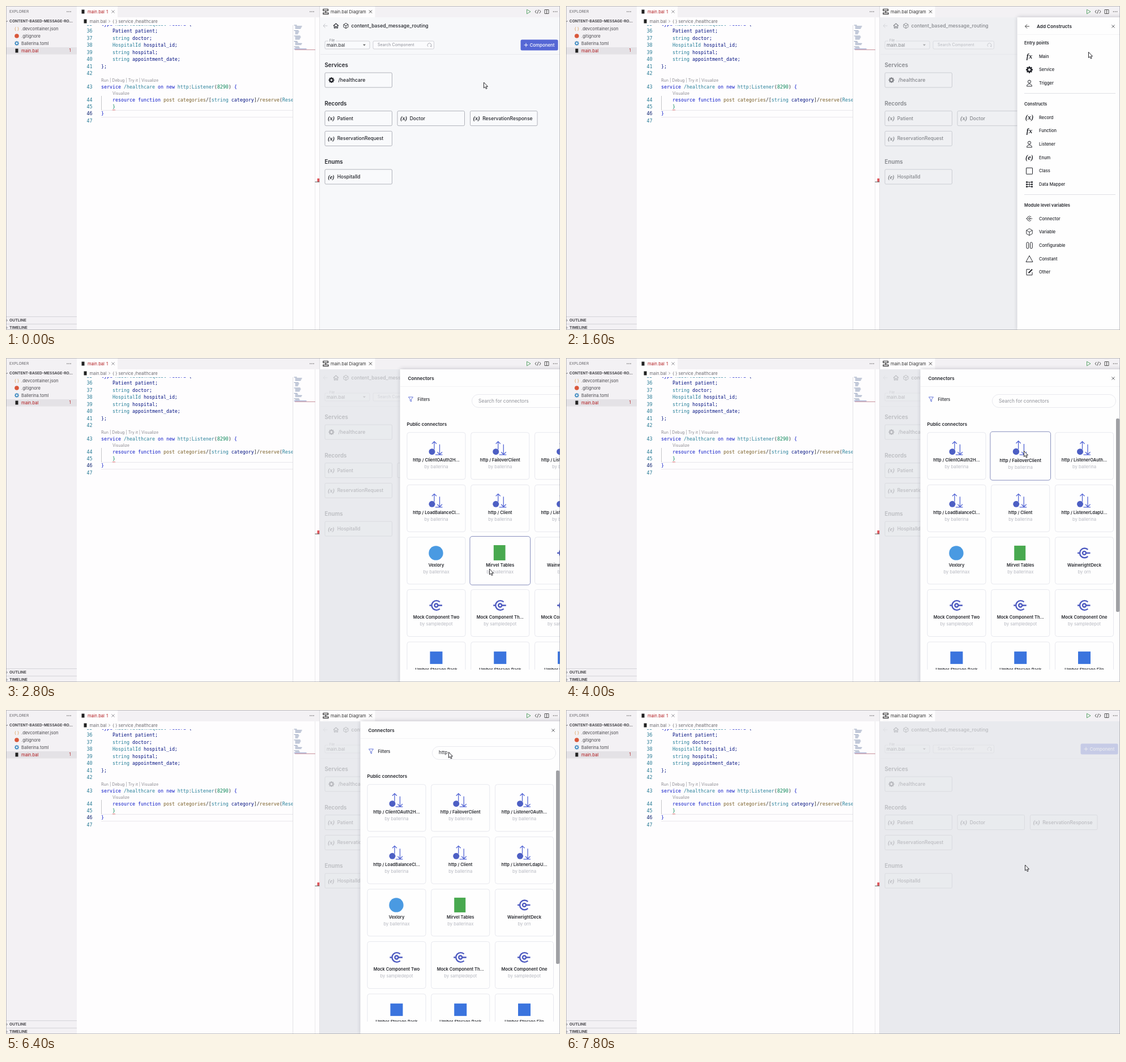
An HTML page with a canvas that plays this animation: 978 by 573 pixels, repeating every 8 s.

```html
<!DOCTYPE html>
<html lang="en">
<head>
<meta charset="utf-8">
<title>Diagram editor</title>
<style>
html, body { margin: 0; width: 100%; height: 100%; overflow: hidden; background: #fefdfe; }
canvas { display: block; width: 978px; height: 573px; }
</style>
</head>
<body>
<canvas></canvas>
<script>
const W = 978, H = 573, LOOP = 8000, STEP = 200;
const canvas = document.querySelector('canvas');
const c = canvas.getContext('2d');
const dpr = window.devicePixelRatio || 1;
canvas.width = W * dpr;
canvas.height = H * dpr;

const INK = '#24262c', BLUE = '#5567d5', RED = '#b0181c';
const SANS = 'Inter, sans-serif', SERIF = '"Liberation Serif", serif', MONO = '"DejaVu Sans Mono", monospace';

// Pointer tip: time, x, y
const POINTER = [
  [0, 843, 134.5], [200, 846, 131], [400, 868, 112], [600, 900, 90], [800, 931, 73], [1000, 936, 69],
  [1400, 935, 70], [1600, 922, 81], [1800, 900, 160], [2000, 874, 265], [2200, 858, 345], [2400, 853, 372.5],
  [3200, 853, 372.5], [3400, 845, 330], [3600, 832, 270], [3800, 818, 218], [4000, 808, 164], [4200, 790, 105],
  [4400, 781, 74], [6800, 781, 74], [7000, 783, 86], [7200, 792, 140], [7400, 804, 225], [7600, 810, 270], [7800, 810, 273.5]
];

const CARDS = [
  ['http / ClientOAuth2H...', 'ballerina', 'http'], ['http / FailoverClient', 'ballerina', 'http'], ['http / ListenerOAuth...', 'ballerina', 'http'],
  ['http / LoadBalanceCl...', 'ballerina', 'http'], ['http / Client', 'ballerina', 'http'], ['http / ListenerLdapU...', 'ballerina', 'http'],
  ['Vexlory', 'ballerinax', 'disc'], ['Mirvel Tables', 'ballerinax', 'green'], ['WainwrightDeck', 'orn', 'plug'],
  ['Mock Component Two', 'sampledepot', 'plug'], ['Mock Component Th...', 'sampledepot', 'plug'], ['Mock Component One', 'sampledepot', 'plug'],
  ['Umber Storage Pack', 'ballerinax', 'blue'], ['Umber Storage Pack', 'ballerinax', 'blue'], ['Umber Storage File', 'ballerinax', 'blue']
];

const CONSTRUCTS = [
  ['Entry points', 65.5, 89, [['Main', 'fx'], ['Service', 'gear'], ['Trigger', 'person']]],
  ['Constructs', 173, 197, [['Record', '(x)'], ['Function', 'fx'], ['Listener', 'person'], ['Enum', '(e)'], ['Class', 'box'], ['Data Mapper', 'mapper']]],
  ['Module level variables', 352, 376, [['Connector', 'plug'], ['Variable', 'cube'], ['Configurable', 'config'], ['Constant', 'triangle'], ['Other', 'edit']]]
];

function rect(x, y, w, h, color) {
  c.fillStyle = color;
  c.fillRect(x, y, w, h);
}

function box(x, y, w, h, r, fill, stroke, width = 1) {
  c.beginPath();
  c.roundRect(x, y, w, h, r);
  if (fill) { c.fillStyle = fill; c.fill(); }
  if (stroke) { c.strokeStyle = stroke; c.lineWidth = width; c.stroke(); }
}

// y is the middle of the capitals
function text(s, x, y, size, color = INK, weight = 400, align = 'left', family = SANS) {
  c.font = `${weight} ${size}px ${family}`;
  c.textAlign = align;
  c.fillStyle = color;
  c.fillText(s, x, y + size * 0.35);
}

function path(d, x, y, stroke, width = 1, fill) {
  const p = new Path2D(d);
  c.save();
  c.translate(x, y);
  if (fill) { c.fillStyle = fill; c.fill(p); }
  if (stroke) { c.strokeStyle = stroke; c.lineWidth = width; c.stroke(p); }
  c.restore();
}

function disc(x, y, r, fill, stroke, width = 1) {
  c.beginPath();
  c.arc(x, y, r, 0, 7);
  if (fill) { c.fillStyle = fill; c.fill(); }
  if (stroke) { c.strokeStyle = stroke; c.lineWidth = width; c.stroke(); }
}

function clip(x, y, w, h, draw) {
  c.save();
  c.beginPath();
  c.rect(x, y, w, h);
  c.clip();
  draw();
  c.restore();
}

const cross = (x, y, color = '#55565c', r = 2.6) => path(`M${-r} ${-r}L${r} ${r}M${r} ${-r}L${-r} ${r}`, x, y, color, 0.9);
const dots = (x, y) => [-3, 0, 3].forEach(d => disc(x + d, y, 0.75, '#444'));
const backArrow = (x, y, color) => path('M4 0H-3.5M0-3.5L-3.5 0L0 3.5', x, y, color);

function gear(x, y, r, color) {
  c.strokeStyle = color;
  c.lineWidth = r * 0.4;
  c.beginPath();
  for (let i = 0; i < 8; i++) {
    const a = i * Math.PI / 4;
    c.moveTo(x, y);
    c.lineTo(x + Math.cos(a) * r, y + Math.sin(a) * r);
  }
  c.stroke();
  disc(x, y, r * 0.78, color);
  disc(x, y, r * 0.36, '#fff');
}

function plug(x, y, s, color, width) {
  path(`M${4.2 * s} ${-4 * s}A${5.6 * s} ${5.6 * s} 0 1 0 ${4.2 * s} ${4 * s}M${7 * s} 0H${2 * s}M${-8 * s} 0H${-5.6 * s}`, x, y, color, width);
  disc(x, y, 2 * s, null, color, width);
}

function cube(x, y, r) {
  const a = r * 0.87, b = r / 2;
  path(`M0 ${-r}L${a} ${-b}V${b}L0 ${r}L${-a} ${b}V${-b}ZM${-a} ${-b}L0 0L${a} ${-b}M0 0V${r}`, x, y, INK, 0.9);
}

function icon(kind, x, y) {
  if (kind === 'gear') gear(x, y, 6, INK);
  else if (kind === 'plug') plug(x, y, 0.75, INK, 0.9);
  else if (kind === 'cube') cube(x, y, 6);
  else if (kind === 'person') {
    disc(x, y - 2.6, 2.6, null, INK);
    path('M-4.5 5.5C-4.5 0 4.5 0 4.5 5.5Z', x, y, INK);
  } else if (kind === 'box') box(x - 5.5, y - 5.5, 11, 11, 0.5, null, INK);
  else if (kind === 'triangle') path('M0-5.5L6 5.5H-6Z', x, y, INK);
  else if (kind === 'config') [-5, 1.5].forEach(d => box(x + d, y - 5.5, 3.7, 11, 1.8, null, INK));
  else if (kind === 'edit') {
    path('M1-5H-5V5H5V0', x, y, INK);
    path('M-1.5 1.5L5-5', x, y, INK, 2.2);
  } else if (kind === 'mapper') {
    path('M-5-4H5M-5 0H5M-5 4H5M0-4V4', x, y, INK, 0.9);
    for (const d of [-4, 0, 4]) { rect(x - 6, y + d - 1.2, 3, 2.4, INK); rect(x + 3, y + d - 1.2, 3, 2.4, INK); }
  } else text(kind, x, y, 12.5, INK, 'italic 700', 'center', SERIF);
}

function drawSidebar() {
  rect(0, 0, 125, H, '#f3f1f4');
  text('EXPLORER', 6, 10, 6.7, '#66656a');
  dots(111, 10);
  path('M-1.5-1L0 1L1.5-1', 1.5, 27, '#666', 0.8);
  text('CONTENT-BASED-MESSAGE-RO...', 6, 27, 6.6, '#48474c', 700);
  rect(0, 73, 125, 12.5, '#e4e2e6');
  text('{ }', 19, 40, 7.5, '#d99a4e', 400, 'center');
  disc(19, 53, 3.8, '#d9583b');
  gear(19, 66, 4, '#4f93c5');
  rect(16.5, 75.5, 5, 7, '#222');
  ['.devcontainer.json', '.gitignore', 'Ballerina.toml', 'main.bal'].forEach((name, i) =>
    text(name, 27, 40 + 13 * i, 7.6, i === 3 ? RED : '#4c4b50'));
  text('1', 113, 79, 7, RED, 400, 'center');
  for (const [name, y] of [['OUTLINE', 556], ['TIMELINE', 569]]) {
    rect(0, y - 7, 125, 0.8, '#cfcdd2');
    path('M-1-1.8L1 0L-1 1.8', 1.5, y, '#666', 0.8);
    text(name, 6, y, 6.8, '#48474c', 700);
  }
}

// Each line: number, middle, then colour-prefixed runs
const COLORS = { b: '#0b18c8', t: '#267f99', n: '#001080', f: '#795e26', k: '#333', g: '#098658' };
const CODE = [
  [35, 32.5, 'b:type ', 't:ReservationRequest ', 'b:record ', 'n:{'],
  [36, 44.5, 'n:    Patient patient;'],
  [37, 57, 't:    string ', 'n:doctor;'],
  [38, 69.5, 't:    HospitalId ', 'n:hospital_id;'],
  [39, 82, 't:    string ', 'n:hospital;'],
  [40, 94.5, 't:    string ', 'n:appointment_date;'],
  [41, 107, 'n:};'],
  [42, 119.5],
  [43, 143, 'b:service ', 't:/healthcare ', 'b:on new ', 't:http', 'k::', 't:Listener', 'k:(', 'g:8290', 'k:) ', 'b:{'],
  [44, 166, 'b:    resource function ', 'f:post categories', 'k:/[', 't:string ', 'n:category', 'k:]/', 'f:reserve', 'k:(', 't:ReservationRequest'],
  [45, 178.5, 'g:    }'],
  [46, 190.5, 'b:}'],
  [47, 203]
];

function drawEditor() {
  rect(125, 0, 429, 20, '#f3f1f4');
  rect(125, 0, 72, 20, '#fefdfe');
  rect(133.5, 6.5, 5, 7, '#222');
  text('main.bal', 144, 10, 7.5, RED);
  text('1', 177, 10, 7.5, RED);
  cross(189, 10, '#8a8a8e');
  dots(540, 10);
  rect(137.5, 23.5, 5, 7, '#222');
  text('main.bal', 147.5, 27, 7.5, '#6b6a70');
  path('M-1.2-2L1.2 0L-1.2 2', 182.5, 27, '#888', 0.8);
  text('{ }', 188, 27, 7.5, '#6b6a70');
  text('service /healthcare', 198.5, 27, 7.6, '#6b6a70');
  clip(125, 34, 382, 539, () => {
    rect(168, 184, 339, 0.9, '#e6e5e9');
    rect(168, 196.2, 339, 0.9, '#e6e5e9');
    rect(168, 159, 0.8, 25, '#b8b8bc');
    for (const [number, y, ...runs] of CODE) {
      text(number, 152.5, y, 8.3, number === 46 ? '#0b216f' : '#237893', 400, 'right', MONO);
      let x = 168;
      for (const run of runs) {
        const s = run.slice(2);
        text(s, x, y, 8.3, COLORS[run[0]], 400, 'left', MONO);
        x += c.measureText(s).width;
      }
    }
    path('M0 0L1.2-1.4L2.4 0L3.6-1.4L4.8 0', 188, 184.5, '#d44', 0.8);
    text('Run | Debug | Try it | Visualize', 168, 131.5, 7.1, '#8b8a90');
    text('Visualize', 188, 154.5, 7.1, '#8b8a90');
  });
  rect(506, 34, 0.8, 539, '#dddce0');
  rect(545.3, 20, 0.8, 553, '#e3e2e6');
  for (let i = 0; i < 22; i++) {
    if (i % 5 === 4) continue;
    const indent = i % 5 === 0 ? 0 : 2;
    rect(508.5 + indent, 33.5 + i * 1.9, 5 + (i * 7) % 8, 1, '#8e9cb8');
  }
  rect(508.5, 75.5, 22, 0.9, '#6577b5');
  rect(510, 76.8, 36, 1, '#c58b96');
  rect(549.5, 305, 4.2, 6, '#e0555a');
  rect(545.5, 310.6, 8.3, 1, '#555');
}

function construct(label, x, y, kind) {
  box(x, y, 118.5, 26, 2, '#f9fafc', '#a9abb3', 0.9);
  if (kind === 'gear') gear(x + 11.5, y + 13, 5, INK);
  else text(kind, x + 11, y + 13, 10.5, INK, 'italic 700', 'center', SERIF);
  text(label, x + (kind === 'gear' ? 23.5 : 21.7), y + 13, kind === 'gear' ? 8.8 : 8.5, INK, 500);
}

function drawDiagram() {
  rect(554, 0, 424, 20, '#f3f1f4');
  rect(554, 0, 97.5, 20, '#fefdfe');
  rect(553.4, 0, 0.8, H, '#d4d4d8');
  path('M-2-4.5H4V-1.5H-4.5V-4.5ZM-4.5 2H4.5V4.5H-4.5ZM0-1.5V2', 564.5, 10, '#222', 1.2);
  text('main.bal Diagram', 573, 10, 7.65, '#333');
  cross(643.5, 10, '#333');
  path('M-3-3.8L3.5 0L-3 3.8Z', 922.5, 10, '#4b9c5b', 0.9);
  path('M-2.5-3L-5 0L-2.5 3M2.5-3L5 0L2.5 3M1-3.5L-1 3.5', 939, 10, '#444', 0.9);
  path('M-3.5-3.5H3.5V3.5H-3.5ZM0-3.5V3.5', 954.5, 10, '#444', 0.9);
  dots(969.5, 10);

  rect(554, 20, 424, 553, '#f7f8fa');
  backArrow(563.5, 35, '#c3c5ca');
  path('M-4.5 0L0-4L4.5 0M-3-1V4H-1V1H1V4H3V-1', 582.5, 35, INK, 1.1);
  cube(600, 35, 4.6);
  text('content_based_message_routing', 609.5, 35, 8.65, INK, 500);
  box(563, 62, 79, 14, 2, '#f9fafc', '#c4c6cc', 0.8);
  rect(569, 60, 13, 4, '#f7f8fa');
  text('File', 571, 61, 5.6, '#777981');
  text('main.bal', 566, 69.2, 8.1, INK);
  path('M-2.5-1.2H2.5L0 1.5Z', 632.5, 69, null, 0, '#666');
  box(648, 62, 107.5, 14, 2, '#fbfbfd', '#c4c6cc', 0.8);
  text('Search Component', 656, 69, 7.1, '#8d8f97');
  path('M2.4 2.8A3.5 3.5 0 1 0-2.4 2.8M2.4 2.8V1M2.4 2.8H3.8', 747.5, 69, '#9a9ca4', 0.8);
  box(908.5, 59.5, 66, 19, 2.5, BLUE);
  path('M-3.4 0H3.4M0-3.4V3.4', 918, 69, '#fff', 1);
  text('Component', 924.5, 69, 7.9, '#fff', 500);
  rect(555, 85, 423, 0.8, '#e6e7eb');

  text('Services', 562.5, 105, 9.8, INK, 600);
  construct('/healthcare', 563, 118, 'gear');
  text('Records', 562.5, 172.7, 9.8, INK, 600);
  construct('Patient', 563, 185.7, '(x)');
  construct('Doctor', 691, 185.7, '(x)');
  construct('ReservationResponse', 819.5, 185.7, '(x)');
  construct('ReservationRequest', 563, 221.4, '(x)');
  text('Enums', 562.5, 276, 9.8, INK, 600);
  construct('HospitalId', 563, 289, '(e)');
}

function drawPanelBase(x) {
  c.save();
  c.shadowColor = 'rgba(60,64,80,.3)';
  c.shadowBlur = 7 * dpr;
  rect(x, 20, W, 553, '#fefefe');
  c.restore();
}

function drawConstructs() {
  drawPanelBase(796.5);
  backArrow(814, 36, '#444');
  text('Add Constructs', 831, 36, 8.2, INK, 600);
  cross(966, 36);
  rect(797, 50, 181, 0.8, '#f0f0f3');
  for (const [title, titleY, firstY, rows] of CONSTRUCTS) {
    text(title, 809, titleY, 7.5, INK, 600);
    rows.forEach(([label, kind], i) => {
      const y = firstY + i * 23.7;
      icon(kind, 818, y);
      text(label, 835, y, 7.5, INK, 500);
    });
  }
  rect(809, 154, 161, 0.9, '#dcdde2');
  rect(809, 333, 161, 0.9, '#dcdde2');
}

function cardIcon(kind, x, y) {
  if (kind === 'http') {
    path('M-3.5 2V-12M-7.5-8L-3.5-12L.5-8M6-7V10M2 6.5L6 11L10.5 6.5M-1.5 11.5H11', x, y, BLUE, 1.3);
    disc(x - 7.5, y + 6, 5.5, '#4d5fc4');
  } else if (kind === 'plug') plug(x, y, 1.5, '#4d5ac0', 2.4);
  else if (kind === 'disc') disc(x - 0.5, y, 12.7, '#4a9ae2');
  else if (kind === 'green') rect(x - 11, y - 13, 20, 26, '#48a94f');
  else rect(x - 11, y - 11, 22, 22, '#3b74de');
}

function drawCard([name, owner, kind], x, y, hovered) {
  const cx = x + 51.5, cy = y + 41.5;
  c.save();
  if (hovered) {
    c.translate(cx, cy);
    c.scale(1.035, 1.035);
    c.translate(-cx, -cy);
  }
  box(x, y, 103, 83, 4, '#fefefe', hovered ? '#7d86b8' : '#e5e6ed', 0.9);
  cardIcon(kind, cx, y + 28);
  text(name, cx, y + 49, 7.5, INK, 600, 'center');
  text(`by ${owner}`, cx, y + 61, 7.7, '#b6b8c0', 400, 'center');
  c.restore();
}

function drawConnectors(t, [px, py]) {
  const dx = t < 3000 ? 70 : 0;
  c.save();
  c.translate(dx, 0);
  drawPanelBase(625.5);
  text('Connectors', 639.5, 36, 8.2, INK, 600);
  cross(966, 36);
  rect(626, 50, 352, 0.8, '#f0f0f3');
  path('M-4-4H4L1 0V4L-1 3V0Z', 644.5, 73, BLUE, 0.9);
  text('Filters', 656.5, 73, 7.4, INK, 500);
  box(752.5, 64.5, 218, 23, 11.5, '#fefefe', '#e6e7ec', 0.9);

  const typed = 'http'.slice(0, Math.max(0, (t - 5200) / STEP));
  if (typed) text(typed, 764, 75.5, 8.4, INK);
  else text('Search for connectors', 764, 75.8, 8.45, '#8f9198');
  const caret = (t >= 4800 && t < 5200) || (t >= 5400 && t < 6400) || (t >= 7000 && t < 7400);
  if (caret) rect(764 + (typed ? c.measureText(typed).width : 0), 70.5, 0.9, 10, INK);

  text('Public connectors', 637.5, 117, 8.1, INK, 600);
  clip(626, 122, 346, 429, () => CARDS.forEach((card, i) => {
    const x = 638 + (i % 3) * 112.75, y = 131.7 + Math.floor(i / 3) * 92.6;
    const hovered = px - dx > x && px - dx < x + 103 && py > y && py < y + 83;
    drawCard(card, x, y, hovered);
  }));
  box(971, 107, 6, 342, 2, '#9fa0a4');
  c.restore();
}

function pointerAt(t) {
  const i = POINTER.findIndex(p => p[0] > t);
  if (i < 0) return POINTER[POINTER.length - 1].slice(1);
  const [t0, x0, y0] = POINTER[i - 1], [t1, x1, y1] = POINTER[i];
  const k = (t - t0) / (t1 - t0);
  return [x0 + (x1 - x0) * k, y0 + (y1 - y0) * k];
}

function dimming(t) {
  if (t < 1200) return 0;
  return t < 2600 ? 0.5 : 0.78;
}

function draw(now) {
  const t = Math.floor((now % LOOP) / STEP) * STEP;
  const pointer = pointerAt(t);
  c.setTransform(dpr, 0, 0, dpr, 0, 0);
  rect(0, 0, W, H, '#fefdfe');
  drawSidebar();
  drawEditor();
  drawDiagram();
  rect(554, 20, 424, 553, `rgba(230,231,235,${dimming(t)})`);
  if (t >= 1400 && t < 2600) drawConstructs();
  if (t >= 2800 && t < 7800) drawConnectors(t, pointer);
  box(0.25, 0.25, W - 0.5, H - 0.5, 0, null, '#8c8b90', 0.7);
  path('M0 0V10L2.3 8L3.9 11.6L5.6 10.8L4 7.4H7Z', pointer[0] + 0.5, pointer[1] + 0.5, '#2a2a2e', 1, '#fff');
  requestAnimationFrame(draw);
}

const start = performance.now();
requestAnimationFrame(function first() { draw(0); });
// Keep the loop clock relative to page load
const baseDraw = draw;
draw = () => baseDraw(performance.now() - start);
</script>
</body>
</html>
```
